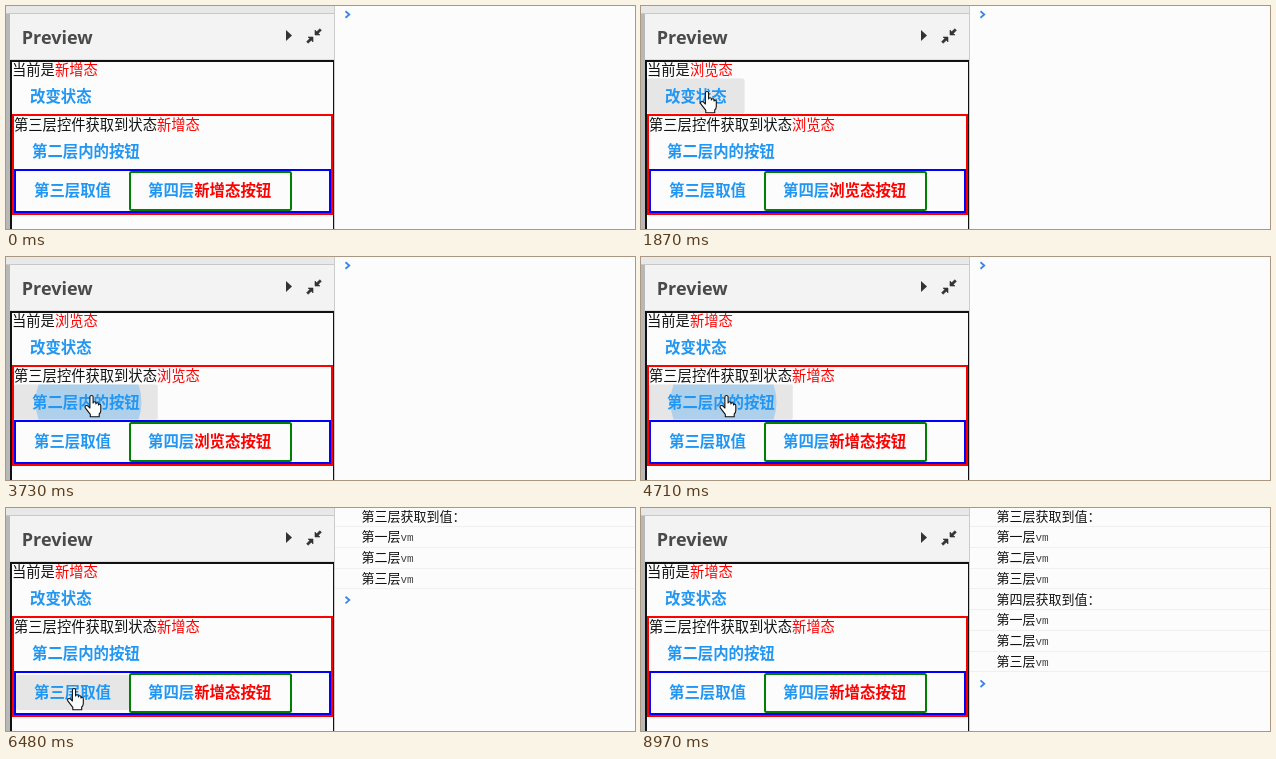
Recreate the animation shown at these times as an HTML page. Size 629 by 223 pixels, loop 9650 ms.

```html
<!DOCTYPE html>
<html lang="zh-CN">
<head>
<meta charset="utf-8">
<title>Preview</title>
<style>
html, body { margin: 0; width: 100%; height: 100%; overflow: hidden; background: #fcfcfc; }
svg { display: block; width: 629px; height: 223px; }
text { font-family: "Noto Sans CJK SC", "Noto Sans CJK", sans-serif; font-size: 14.3px; fill: #111; white-space: pre; }
.title { font: 700 18px "Open Sans", sans-serif; fill: #4a4a4a; }
.btn { font-size: 15.4px; font-weight: 700; fill: #2196f3; }
.red { fill: #f00; }
.log text { font-size: 13px; fill: #111; }
.log .vm { font: 11px "Liberation Mono", monospace; fill: #444; }
.log path { stroke: #f0f0f0; }
.box { fill: none; stroke-width: 2; }
</style>
</head>
<body>
<svg viewBox="0 0 629 223">
  <rect width="629" height="223" fill="#fcfcfc"/>
  <rect width="328" height="8" fill="#e8e8e8"/>
  <rect y="7" width="328" height="1" fill="#c8c8c8"/>
  <rect y="8" width="4" height="215" fill="#b8b8b8"/>
  <rect x="4" y="8" width="324" height="45" fill="#f3f3f3"/>
  <rect x="4" y="53" width="324" height="1" fill="#ddd"/>
  <text class="title" x="15.8" y="38">Preview</text>
  <path d="M280 24L286 29.5L280 35Z" fill="#333"/>
  <path d="M309 24V29H314L312.3 27.4L315.4 24.3L313.8 22.7L310.7 25.8ZM307 36V31H302L303.7 32.6L300.6 35.7L302.2 37.3L305.3 34.2Z" fill="#333" stroke="#333" stroke-width=".6"/>
  <g id="fills"></g>
  <g class="box">
    <path d="M5 223V55H328V223" stroke="#111"/>
    <rect x="7" y="109" width="319" height="99" stroke="#f00"/>
    <rect x="9" y="164" width="315" height="42" stroke="#00f"/>
    <rect x="124" y="166" width="161" height="38" rx="1.5" stroke="#008000"/>
  </g>
  <rect x="328" width="1" height="223" fill="#ccc"/>
  <text x="6" y="69.4">当前是<tspan class="red mode"></tspan></text>
  <text x="8" y="124.4">第三层控件获取到状态<tspan class="red mode"></tspan></text>
  <g id="labels"></g>
  <g id="logs" class="log"></g>
  <path id="prompt" d="M339.5 -3.3L343.3 0L339.5 3.3" fill="none" stroke="#3a84e6" stroke-width="1.8"/>
  <g id="cursor" fill="#fff" stroke="#111" stroke-width="1.1" stroke-linejoin="round">
    <path id="hand" d="M-1.6 13V1.8Q-1.5 .5 0 .5T1.6 1.8V8Q1.7 6.8 3 6.8T4.4 8V9Q4.6 7.6 5.8 7.8T7 9V10Q7.4 9 8.4 9.3T9.3 11V15.5Q9.3 17.5 7.7 19V21.7H-1.2V19.4L-6 13.2Q-7.1 11.5 -5.8 10.8T-3.2 11.4Z"/>
    <path id="arrow" d="M0 0V16L3.7 12.5L6.2 18L8.5 17L6.1 11.6H11Z"/>
  </g>
</svg>
<script>
const LOOP = 9650, BEAT = 135, ROW = 20.75, PAD = 18, SIZE = 15.4, HEIGHT = 35;
const $ = id => document.getElementById(id);
const all = selector => [...document.querySelectorAll(selector)];
const clamp = v => Math.max(0, Math.min(1, v));
const show = (el, on) => el.setAttribute('visibility', on ? 'visible' : 'hidden');
const set = (el, attrs) => { for (const k in attrs) el.setAttribute(k, attrs[k]); };

// Each button: text position, label, where the cursor rests
const MODE = '<tspan class="red"><tspan class="mode">新增态</tspan>按钮</tspan>';
const buttons = [
  { x: 24, y: 90, label: '改变状态', spot: [66, 85] },
  { x: 26, y: 145, label: '第二层内的按钮', spot: [85.5, 138] },
  { x: 28, y: 184.5, label: '第三层取值', spot: [68, 180] },
  { x: 142, y: 184.5, label: '第四层' + MODE, spot: [205, 182] }
];
const entry = [92, 70], exit = [640, 230];

// The cursor moves to a spot or clicks a button; every beat redraws once
const move = (at, beats, to) => ({ at, beats, to });
const click = (at, beats, target) => ({ at, beats, target });
const [first, second, third, fourth] = buttons;
const script = [
  move(430, 3, first.spot), click(1570, 2, first), click(2310, 3, first),
  move(3160, 2, second.spot), click(3730, 2, second), click(4710, 2, second),
  move(5500, 3, third.spot), click(6210, 2, third),
  move(7200, 4, fourth.spot), click(8010, 3, fourth), move(8415, 4, exit)
];
const end = a => a.at + a.beats * BEAT;
const moves = script.filter(a => a.to);
const clicks = script.filter(a => a.target);
const leave = moves[moves.length - 1];

$('labels').innerHTML = buttons.map(b => `<text class="btn" x="${b.x}" y="${b.y + 5.5}">${b.label}</text>`).join('');
$('fills').innerHTML = buttons.map((b, i) => {
  const length = b.label.replace(/<[^>]*>/g, '').length;
  Object.assign(b, { left: b.x - PAD, top: b.y - HEIGHT / 2, width: length * SIZE + 2 * PAD });
  const shape = `<rect x="${b.left}" y="${b.top}" width="${b.width}" height="${HEIGHT}" rx="2"`;
  return `<clipPath id="clip${i}">${shape}/></clipPath>${shape} class="hover" fill="#e6e6e6"/>
    <g clip-path="url(#clip${i})"><circle class="ripple" fill="#2196f3"/></g>`;
}).join('');

const lines = ['三', '四'].flatMap(n =>
  [`第${n}层获取到值：`, ...['一', '二', '三'].map(k => `第${k}层<tspan class="vm">vm</tspan>`)]);
$('logs').innerHTML = lines.map((line, i) =>
  `<g><text x="355.5" y="${12.7 + ROW * i}">${line}</text><path d="M329 ${18.5 + Math.round(ROW * i)}H629"/></g>`).join('');

const rows = [...$('logs').children];
const hovers = all('.hover'), ripples = all('.ripple'), modes = all('.mode');

// Hold the picture between beats
function snap(t) {
  const a = script.filter(s => s.at <= t).pop();
  return a ? a.at + BEAT * Math.min(a.beats, Math.floor((t - a.at) / BEAT + 1e-6)) : 0;
}

function pointer(t) {
  let [x, y] = entry;
  for (const m of moves) {
    if (t < m.at) break;
    const p = clamp(((t - m.at) / BEAT + 1) / (m.beats + 1));
    const ease = 1 - (1 - p) ** 2;
    x += (m.to[0] - x) * ease;
    y += (m.to[1] - y) * ease;
  }
  return [x, y];
}

function over(b, t) {
  const [x, y] = pointer(snap(t));
  return x >= b.left && x <= b.left + b.width && y >= b.top && y <= b.top + HEIGHT ? 1 : 0;
}

function render(time) {
  const t = snap(time), visible = t >= moves[0].at && t < end(leave) - 1;
  set($('cursor'), { transform: `translate(${pointer(t)})` });
  show($('hand'), visible && t < leave.at);
  show($('arrow'), visible && t >= leave.at);
  buttons.forEach((b, i) => set(hovers[i], { opacity: (over(b, t) + over(b, t - BEAT)) / 2 }));

  ripples.forEach(el => set(el, { opacity: 0 }));
  let toggles = 0, count = 0;
  for (const c of clicks) {
    if (t < c.at) break;
    const age = (t - c.at) / BEAT + 3 - c.beats;
    const i = buttons.indexOf(c.target);
    if (age >= 0.99) i < 2 ? toggles++ : count += 4;
    if (age > 3) continue;
    const [x, y] = c.target.spot;
    set(ripples[i], { cx: x - 3, cy: y + 7, r: 8 + 45 * age, opacity: 0.28 * clamp((3 - age) / 2) });
  }
  modes.forEach(el => { el.textContent = toggles % 2 ? '浏览态' : '新增态'; });
  rows.forEach((el, i) => show(el, i < count));
  set($('prompt'), { transform: `translate(0 ${8.5 + 20.9 * count})` });
}

const start = performance.now();
function tick() {
  render((performance.now() - start) % LOOP);
  requestAnimationFrame(tick);
}
tick();
</script>
</body>
</html>
```
